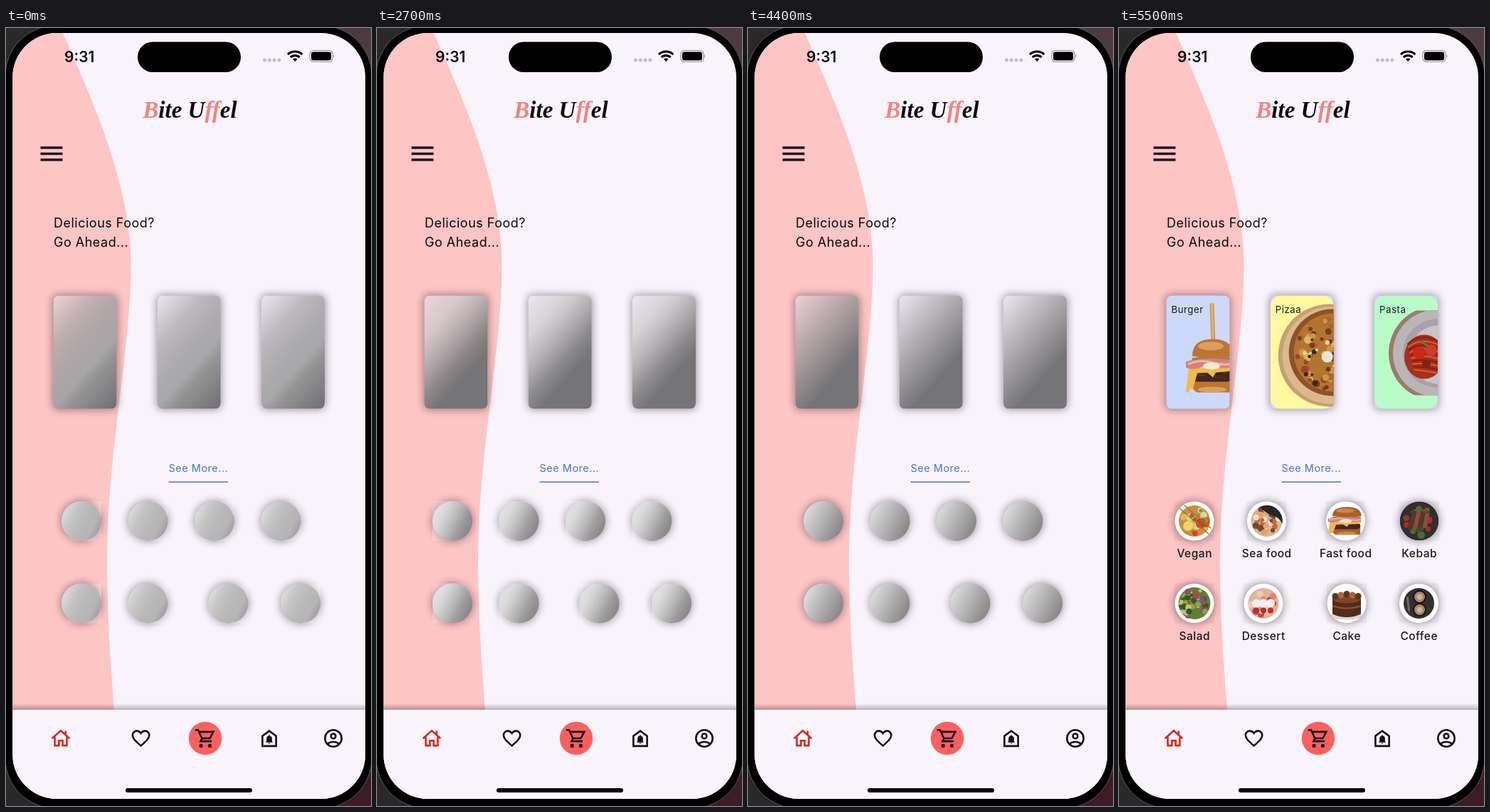
An HTML page for the animation above (5.6 s loop, 513 by 1092 pixels).

```html
<!DOCTYPE html>
<html lang="en">
<head>
<meta charset="utf-8">
<title>Food app loading</title>
<style>
  html, body { margin: 0; width: 100%; height: 100%; overflow: hidden; background: #000; }
  svg { display: block; }
  body > svg { width: 513px; height: 1092px; }
  text { font-family: Inter, "Liberation Sans", sans-serif; letter-spacing: .5px; fill: #0d0a10; }
  .time { font-size: 21px; font-weight: 600; letter-spacing: 0; }
  .brand { font: italic bold 33px "Liberation Serif", serif; letter-spacing: 0; text-anchor: middle; }
  .brand .hot { fill: #f4837f; }
  .lead { font-size: 18px; }
  .more { font-size: 14.5px; fill: #4a74d2; }
  .title { font-size: 13.3px; fill: #1d1a24; }
  .label { font-size: 15.5px; font-weight: 500; text-anchor: middle; fill: #1b1720; }
  .icon { fill: none; stroke: #140f16; stroke-width: 2; }
  .icon .solid { fill: #140f16; stroke: none; }
</style>
</head>
<body>
<svg viewBox="0 0 513 1092">
  <defs>
    <clipPath id="screen"><rect x="9.3" y="7" width="495.7" height="1075" rx="62"/></clipPath>
    <clipPath id="cardClip"><rect width="89" height="159" rx="8"/></clipPath>
    <clipPath id="dishClip"><circle r="27.5"/></clipPath>
    <filter id="blur" x="-40%" y="-40%" width="180%" height="180%"><feGaussianBlur stdDeviation="6"/></filter>
    <linearGradient id="navShade" x2="0" y2="1">
      <stop stop-color="#000" stop-opacity="0"/><stop offset="1" stop-color="#000" stop-opacity=".27"/>
    </linearGradient>
  </defs>

  <rect width="513" height="1092" fill="#2b2829"/>
  <rect x="440" width="73" height="80" fill="#4d3a41"/>
  <rect x="440" y="1010" width="73" height="82" fill="#3d1c25"/>
  <rect x="-1" y="-3" width="515" height="1098" rx="70" stroke="#59575a"/>

  <g clip-path="url(#screen)">
    <rect width="513" height="1092" fill="#f9f4fc"/>
    <path fill="#fdc5c4" d="M9 7H80C125 110 175.5 220 175.5 335C175.5 450 142 600 142 745C142 825 147 890 152 957H9Z"/>
    <rect y="948" width="513" height="9" fill="url(#navShade)"/>
    <rect y="957" width="513" height="135" fill="#f9f4fc"/>
  </g>

  <text class="time" x="82" y="47.5">9:31</text>
  <rect x="185" y="19.5" width="145" height="42.5" rx="21.2"/>
  <g fill="#c2bdc6">
    <circle cx="363.5" cy="45" r="2.5"/><circle cx="370.3" cy="45" r="2.5"/>
    <circle cx="377.1" cy="45" r="2.5"/><circle cx="383.9" cy="45" r="2.5"/>
  </g>
  <g fill="none" stroke="#000" stroke-width="3.2">
    <path d="M396 37.2A14.5 14.5 0 0 1 416.4 37.2M399.8 41.2A9 9 0 0 1 412.6 41.2"/>
    <path d="M406.2 47L403 43.8A4.6 4.6 0 0 1 409.4 43.8Z" fill="#000" stroke="none"/>
  </g>
  <rect x="427" y="31.5" width="32" height="16" rx="5" fill="none" stroke="#99949c" stroke-width="1.2"/>
  <rect x="429" y="33.5" width="28" height="12" rx="3.3"/>
  <path d="M460.3 36.8Q462.4 39.5 460.3 42.2Z" fill="#99949c"/>

  <text class="brand" x="258.5" y="126"><tspan class="hot">B</tspan>ite U<tspan class="hot">ff</tspan>el</text>
  <path d="M48.5 167.9H79.5M48.5 176.5H79.5M48.5 185.1H79.5" stroke="#1b1420" stroke-width="3.5"/>
  <text class="lead" x="67" y="280">Delicious Food?</text>
  <text class="lead" x="67" y="306.5">Go Ahead...</text>
  <text class="more" x="228.5" y="623">See More...</text>
  <path d="M228.5 637.3H312" stroke="#4a74d2" stroke-width="1.6"/>

  <g id="skeleton"></g>
  <g id="content"></g>

  <circle cx="280" cy="997" r="23.2" fill="#fd5f5f"/>
  <g class="icon" transform="translate(61.4 981.4) scale(1.3)" style="stroke:#d9271c">
    <path d="M2.5 12.2L12 3.8L21.5 12.2M5.5 10.5V19.8H10V14.5H14V19.8H18.5V10.5M17.2 4V8"/>
  </g>
  <g class="icon" transform="translate(174 981.4) scale(1.3)">
    <path d="M12 20C5 14 3 11.5 3 8.5C3 6 5 4 7.5 4C9.3 4 11 5 12 6.5C13 5 14.7 4 16.5 4C19 4 21 6 21 8.5C21 11.5 19 14 12 20Z"/>
  </g>
  <g class="icon" transform="translate(264.4 981.4) scale(1.3)">
    <path d="M1 3H4.3L8.5 12.2M5.5 5H20.7L17 12H8.5L7 15.2H19"/>
    <circle class="solid" cx="7.5" cy="20" r="2"/><circle class="solid" cx="17" cy="20" r="2"/>
  </g>
  <g class="icon" transform="translate(354.4 981.4) scale(1.3)">
    <path d="M4.6 20.4V9.4L12 4L19.4 9.4V20.4Z"/>
    <path class="solid" d="M8 16.5L9 15.3V12.5C9 10.5 10 9.6 11.3 9.3V8.6H12.7V9.3C14 9.6 15 10.5 15 12.5V15.3L16 16.5ZM10.8 17H13.2Q12 19 10.8 17Z"/>
  </g>
  <g class="icon" transform="translate(444.4 981.4) scale(1.3)">
    <circle cx="12" cy="12" r="9"/><circle cx="12" cy="9.6" r="2.6"/><path d="M6 18.2C8 15 16 15 18 18.2"/>
  </g>
  <rect x="168" y="1067" width="178" height="6" rx="3"/>
</svg>

<script>
const LOOP = 5600, STEP = 100, LOADED_AT = 4600;
const SHIMMER = 3000, HALF_BAND = 0.5;
const svg = document.querySelector('svg');
const defs = svg.querySelector('defs');
const skeleton = document.getElementById('skeleton');
const content = document.getElementById('content');

function add(parent, tag, attrs, text) {
  const node = document.createElementNS('http://www.w3.org/2000/svg', tag);
  for (const key in attrs) node.setAttribute(key, attrs[key]);
  if (text) node.textContent = text;
  return parent.appendChild(node);
}
const at = (parent, x, y, extra = '') => add(parent, 'g', { transform: `translate(${x} ${y}) ${extra}` });
const disc = (g, cx, cy, r, fill) => add(g, 'circle', { cx, cy, r, fill });
const oval = (g, cx, cy, rx, ry, fill) => add(g, 'ellipse', { cx, cy, rx, ry, fill });
const box = (g, x, y, width, height, rx, fill) => add(g, 'rect', { x, y, width, height, rx, fill });
const shape = (g, d, fill) => add(g, 'path', { d, fill });
const line = (g, d, stroke, width) => add(g, 'path', { d, stroke, 'stroke-width': width, fill: 'none', 'stroke-linecap': 'round' });

function shadow(node, opacity) {
  node.setAttribute('filter', 'url(#blur)');
  node.setAttribute('opacity', opacity);
}

// Both tones and highlight run from the top left to the middle of the right side.
function gradient(id, w, h, stops) {
  const node = add(defs, 'linearGradient', { id, gradientUnits: 'userSpaceOnUse', x1: 0, y1: 0, x2: w, y2: h / 2 });
  for (const [offset, color, alpha = 1] of stops)
    add(node, 'stop', { offset, 'stop-color': color, 'stop-opacity': alpha });
  return node;
}
gradient('pinkTone', 89, 159, [[0, '#ecd2d4'], [1, '#757476']]);
gradient('greyTone', 89, 159, [[0, '#ece7ee'], [1, '#757476']]);
gradient('dishTone', 56, 56, [[0, '#eaeaea'], [1, '#8c8a8b']]);
const glow = [[0, '#fff', 0], [0.5, '#fff', 0.3], [1, '#fff', 0]];
const bands = [[89, 159], [56, 56]].map(([w, h]) => ({ w, h, node: gradient('band' + w, w, h, glow) }));

function scatter(g, seed, count, spread, size, colors) {
  const rnd = () => (seed = (seed * 16807) % 2147483647) / 2147483647;
  rnd();
  for (let i = 0; i < count; i++) {
    const a = rnd() * 6.283, r = Math.sqrt(rnd()) * spread;
    disc(g, r * Math.cos(a), r * Math.sin(a), size * (0.6 + 0.7 * rnd()), colors[i % colors.length]);
  }
}

function burger(g, bun, shine) {
  shape(g, 'M-27 18H31V37H-18Q-27 34 -27 18Z', bun);
  oval(g, 3, 33, 20, 4, shine);
  box(g, -27, 5, 58, 17, 7, '#43261d');
  scatter(at(g, 3, 13, 'scale(1 .22)'), 43, 14, 26, 4, ['#6b3b28', '#2b1813']);
  shape(g, 'M-30 3L32 1V7L8 9L4 16L-4 9L-18 10L-24 32H-28L-30 37H-34Z', '#eebb4c');
  shape(g, 'M-34 -6Q-10 -15 32 -11L33 1Q10 6 -6 -2Q-20 8 -34 2Z', '#d9807a');
  line(g, 'M-30 -3Q-14 -10 4 -5T31 -4', '#efb3a8', 3);
  oval(g, 2, 0, 12, 5, '#f8e9dc');
  line(g, 'M-24 -10Q0 -14 30 -10', '#8d8a46', 3);
  shape(g, 'M-25 -14Q-25 -38 4 -38Q33 -38 33 -13Q4 -8 -25 -14Z', bun);
  oval(g, 1, -28, 18, 6, shine);
}

function pizza(g) {
  disc(g, 83, 84, 72, '#c99f70');
  disc(g, 85, 84, 68, '#dcb98d');
  disc(g, 87, 80, 61, '#8f5228');
  disc(g, 88, 80, 55, '#b3742f');
  const top = at(g, 88, 80);
  scatter(top, 91, 80, 52, 4.2, ['#dfb468', '#9a4722', '#cf9548', '#74401f', '#a9652c']);
  scatter(top, 37, 34, 50, 2.8, ['#2f282a', '#7e2f20', '#e9d09a']);
  disc(g, 80, 86, 8, '#e6e4d6');
}

function pasta(g) {
  const photo = add(g, 'svg', { x: 0, y: 21, width: 89, height: 119 });
  const plate = at(photo, 86, 60);
  disc(plate, 0, 0, 66, '#9c7c69');
  disc(plate, 1, 0, 61, '#bcb4b8');
  disc(plate, 2, 0, 48, '#a7a2a9');
  disc(plate, 4, 2, 41, '#c8c3c5');
  const food = at(photo, 70, 65);
  oval(food, 0, 0, 28, 31, '#a92f1b');
  for (let i = 0; i < 10; i++)
    line(food, `M${-23 + i} ${-18 + i * 4}Q${-6 + i} ${-34 + i * 6} 20 ${-22 + i * 5}`, i % 2 ? '#d4622f' : '#86200f', 2);
  disc(food, -7, -6, 9, '#c92a1c');
  disc(food, 10, -9, 8, '#d13a25');
  disc(food, 3, 10, 6, '#7e2318');
  line(food, 'M-4 -21L6 -15', '#5c7a35', 3);
}

function burgerCard(g) {
  shape(g, 'M61 11H67L69 66H63Z', '#cf9a55');
  shape(g, 'M63 11H65L67 66H65Z', '#e3bb80');
  burger(at(g, 61.5, 99), '#bd7535', '#dd9f5c');
}

function cake(g) {
  oval(g, 0, 18, 24, 5, '#dcd6d4');
  shape(g, 'M-20 -7H20V15Q0 24 -20 15Z', '#542b1c');
  line(g, 'M-19 4Q0 10 19 4', '#8a5437', 2);
  oval(g, 0, -7, 20, 7, '#7d452b');
  for (let i = -2; i < 3; i++) disc(g, i * 8, -10 - (2 - Math.abs(i)) * 1.5, 4.5, i % 2 ? '#a3683f' : '#623320');
}

const dishes = {
  Vegan(g) {
    disc(g, 0, 0, 22, '#d18c3c');
    scatter(g, 12, 34, 18, 4, ['#e8b64a', '#8b9a3c', '#cc4a22', '#e3d3a0']);
    disc(g, -9, 7, 7, '#f2d468');
    disc(g, 9, 3, 7, '#c84324');
    line(g, 'M-22 -19L20 18M-14 -22L23 10', '#6d8748', 1.4);
  },
  'Sea food'(g) {
    disc(g, 0, 0, 22, '#d9b791');
    scatter(g, 55, 34, 18, 3.6, ['#e8a06a', '#f2e4d2', '#6a4a3c', '#c8633b']);
    shape(g, 'M-9 -20A22 22 0 0 1 22 4Q17 -6 8 -8T-9 -20Z', '#23262b');
  },
  'Fast food'(g) { burger(at(g, -1, 0, 'scale(.7 .52)'), '#a9602b', '#cc8746'); },
  Kebab(g) {
    disc(g, 0, 0, 27.5, '#302e33');
    scatter(g, 71, 18, 21, 4, ['#4e6b2c', '#b7281f', '#37522a']);
    for (let i = 0; i < 4; i++) line(g, `M${-13 + i * 7} ${10 - i}L${-7 + i * 6} ${-11 + i}`, i % 2 ? '#84503c' : '#5a3328', 6);
  },
  Salad(g) {
    disc(g, 0, 0, 22.5, '#5f7f35');
    scatter(g, 23, 52, 20, 3.5, ['#83a548', '#345a24', '#c4402c', '#b7c66c', '#8a4d78']);
  },
  Dessert(g) {
    disc(g, 0, 0, 21.5, '#e2b29a');
    scatter(g, 19, 18, 17, 4, ['#c5473f', '#efcbb2', '#d98870']);
    for (let i = -1; i < 2; i++) { disc(g, i * 10, 0, 6, '#f7f0ec'); disc(g, i * 10, 10, 4, '#bd2c2b'); }
  },
  Cake: cake,
  Coffee(g) {
    disc(g, 0, 0, 21.5, '#35302e');
    for (const [x, y] of [[1, -9], [1, 9]]) {
      disc(g, x, y, 9.5, '#171415'); disc(g, x, y, 7.5, '#a68468'); disc(g, x, y, 4, '#cdb193');
    }
    line(g, 'M-16 -8L-14 10', '#77675c', 3);
  }
};

const cards = [
  [66.5, 'Burger', '#cdd9fa', burgerCard],
  [212.7, 'Pizaa', '#fffaa0', pizza],
  [359, 'Pasta', '#b8fdc9', pasta]
];
cards.forEach(([x, name, color, paint], i) => {
  for (const layer of [skeleton, content]) {
    const g = at(layer, x, 375.5);
    shadow(box(g, -1, -1, 91, 161, 8, '#17101c'), 0.42);
    const face = add(g, 'g', { 'clip-path': 'url(#cardClip)' });
    if (layer === skeleton) {
      box(face, 0, 0, 89, 159, 0, i ? 'url(#greyTone)' : 'url(#pinkTone)');
      box(face, 0, 0, 89, 159, 0, 'url(#band89)');
    } else {
      box(face, 0, 0, 89, 159, 0, '#cdd9fa');
      box(face, 0, 0, 89, 159, 15, color);
      paint(face);
      add(g, 'text', { class: 'title', x: 7, y: 24.5 }, name);
    }
  }
});

const rows = [
  [692, [106, 199.5, 293, 386.3], [106, 207.5, 318.5, 422]],
  [807.5, [106, 199.5, 312.5, 414], [106, 203, 320, 421.5]]
];
const names = Object.keys(dishes);
rows.forEach(([y, blanks, plates], row) => {
  for (const x of blanks) {
    const g = at(skeleton, x, y);
    shadow(disc(g, 0, 0, 28.5, '#17101c'), 0.42);
    const face = at(g, -28, -28);
    add(face, 'circle', { cx: 28, cy: 28, r: 28, fill: 'url(#dishTone)' });
    box(face, 0, 0, 56, 56, 0, 'url(#band56)');
  }
  plates.forEach((x, i) => {
    const name = names[row * 4 + i], g = at(content, x, y);
    shadow(disc(g, 0, 0, 28.5, '#17101c'), 0.42);
    add(g, 'rect', { x: -28, y: -28, width: 56, height: 56, opacity: 0.04 });
    disc(g, 0, 0, 27.5, '#fff');
    dishes[name](add(g, 'g', { 'clip-path': 'url(#dishClip)' }));
    add(g, 'text', { class: 'label', x: 0.2, y: 51 }, name);
  });
});

function render(now) {
  const t = Math.floor((now % LOOP) / STEP) * STEP;
  const loaded = t >= LOADED_AT;
  skeleton.style.display = loaded ? 'none' : '';
  content.style.display = loaded ? '' : 'none';
  const phase = t % SHIMMER;
  const offset = phase > SHIMMER / 2 ? phase - SHIMMER : phase;
  const center = 0.88 + offset / 530;
  for (const { w, h, node } of bands) {
    const from = center - HALF_BAND, to = center + HALF_BAND;
    node.setAttribute('x1', from * w);
    node.setAttribute('y1', from * h / 2);
    node.setAttribute('x2', to * w);
    node.setAttribute('y2', to * h / 2);
  }
}
function tick() {
  render(performance.now());
  requestAnimationFrame(tick);
}
tick();
</script>
</body>
</html>
```
